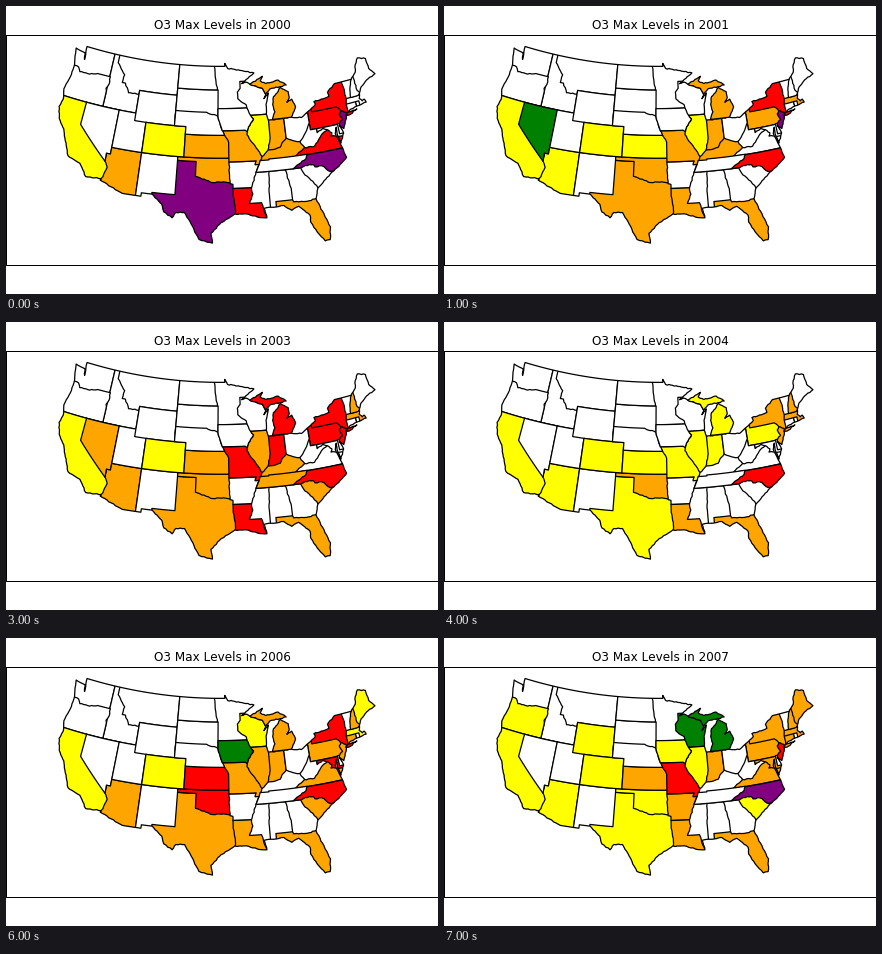
A matplotlib script that plays this animation: 432 by 288 pixels, repeating every 8000 ms.

```python
import numpy as np
import matplotlib.pyplot as plt
from matplotlib.animation import FuncAnimation
from matplotlib.patches import Polygon

W, H, DPI = 432, 288, 72
LINE = 1.25
rng = np.random.default_rng(7)
plt.rcParams["text.kerning_factor"] = 6


def project(lonlat):
    """Lambert conformal conic, standard parallels 33 and 45, to pixels."""
    lon, lat = np.radians(lonlat).T
    p1, p2 = np.radians([33, 45])
    t = lambda p: np.tan(np.pi / 4 + p / 2)
    n = np.log(np.cos(p1) / np.cos(p2)) / np.log(t(p2) / t(p1))
    rho = np.cos(p1) * t(p1) ** n / n / t(lat) ** n
    theta = n * (np.radians(96) - lon)
    return np.c_[214.5 + 437.2 * rho * np.sin(theta),
                 -401.2 + 439 * rho * np.cos(theta)]


def trace(nums, rough=0.07):
    """Outline through key points (west lon, lat): edges along a meridian or
    parallel stay straight, rivers and shores wander a little."""
    pts = np.reshape(nums, (-1, 2)).astype(float)
    out = []
    for a, b in zip(pts, np.roll(pts, -1, axis=0)):
        step = b - a
        size = np.hypot(*step)
        k = int(np.ceil(size / 0.4))
        wander = rng.uniform(-rough, rough, k) * bool(step.all())
        wander[0] = 0
        side = np.array([-step[1], step[0]]) / size
        out += [a + step * j / k + side * wander[j] for j in range(k)]
    return project(np.array(out))


fig = plt.figure(figsize=(W / DPI, H / DPI), dpi=DPI, facecolor="white")
ax = fig.add_axes([0, 0.1, 1, 0.8])
ax.set(xlim=(0, W), ylim=(0.9 * H, 0.1 * H), xticks=[], yticks=[])
ax.spines[:].set_linewidth(1)
title = ax.set_title("", fontsize=12, family="DejaVu Sans")

pacific = [122.76, 49, 122.5, 47.3, 122.8, 48.14, 124.72, 48.39, 124.05, 46.3,
           124.1, 44.6, 124.55, 42.84, 124.1, 41.5, 124.4, 40.44,
           123.75, 38.95, 122.5, 37.8, 121.9, 36.7, 120.65, 34.6,
           118.5, 34.03, 117.12, 32.53]
mexico = [114.72, 32.72, 114.81, 32.5, 111.07, 31.33, 108.21, 31.33,
          108.21, 31.78, 106.53, 31.78, 104.9, 30.6, 104.5, 29.65,
          103.2, 28.98, 102.7, 29.7, 101.4, 29.77, 100.3, 28.3, 99.1, 26.4]
gulf = [97.15, 25.96, 97.4, 27.2, 95.9, 28.6, 93.85, 29.7, 91.8, 29.6,
        90.2, 29.1, 89.1, 29, 89.4, 30.25, 86.4, 30.38, 85.3, 29.65,
        84.2, 30.05, 82.7, 28.7, 82.75, 27.8, 81.8, 26.1, 81.1, 25.15]
atlantic = [80.4, 25.2, 80.03, 26.8, 81.45, 30.7, 80.88, 32.04, 79.2, 33.2,
            77.95, 33.87, 76.5, 34.65, 75.53, 35.23, 75.95, 36.9, 76.3, 38,
            76.5, 38.6, 76.1, 39.4, 76.2, 38.6, 75.95, 37.2, 75.1, 38.45,
            75.5, 39.5, 74.9, 39, 74, 40.4, 74, 40.7, 72.9, 41.25,
            70.65, 41.55, 70, 41.6, 70.2, 42.05, 70.6, 41.9, 71, 42.3,
            70.7, 43, 70.1, 43.7, 68.8, 44.35]
north = [66.97, 44.8, 67.78, 45.7, 67.8, 47.07, 69.23, 47.46, 70, 46.7,
         70.4, 45.75, 71.5, 45.01, 74.7, 45.01, 76.3, 44.1, 76.2, 43.55,
         79.05, 43.27, 78.9, 42.85, 81.7, 41.5, 83.45, 41.73, 87.53, 41.7,
         87.8, 42.49, 87.7, 43.8, 87.1, 45.25, 88, 44.55, 87.6, 45.1,
         88.1, 45.9, 90.42, 46.56, 91, 46.85, 92.02, 46.7, 89.5, 48,
         93.3, 48.6, 94.6, 48.72, 95.15, 49.38, 95.15, 49]

style = dict(ec="black", lw=LINE, joinstyle="round")
land = ax.add_patch(Polygon(
    trace(pacific + mexico + gulf + atlantic + north, 0.06),
    fc="none", zorder=3, **style))
shapes = []   # (state code, patch)


def state(code, *nums, rough=0.07, inland=True):
    """Paint a state over the earlier ones, cut off at the shore."""
    patch = ax.add_patch(Polygon(trace(nums, rough), fc="white", zorder=2,
                                 **style))
    if inland:
        patch.set_clip_path(land)
    else:
        patch.set_zorder(4)
    shapes.append((code, patch))


def box(code, west, east, south, north):
    state(code, west, north, east, north, east, south, west, south)


# Later states cover earlier ones, so each border is given by the upper one.
# West
box("WA", 126, 117.03, 45, 50)
box("ID", 117.03, 111.05, 42, 50)
state("OR", 126, 46.25, 123.2, 46.15, 122.7, 45.6, 121.2, 45.65, 119, 46,
      116.92, 46, 116.85, 45, 117.2, 44.4, 117.03, 43.8, 117.03, 42, 126, 42)
box("CA", 126, 114, 32, 42)
state("NV", 120, 42, 114.04, 42, 114.04, 36.1, 114.7, 36.1, 114.63, 35,
      120, 39, rough=0)
state("AZ", 114.05, 37, 109.05, 37, 109.05, 31, 114.8, 31, 114.72, 32.72,
      114.5, 33, 114.14, 34.3, 114.63, 35, 114.7, 36.1, 114.05, 36.1)
box("UT", 114.05, 109.05, 37, 42)
state("MT", 116.05, 50, 104.05, 50, 104.05, 45, 111.05, 45, 111.05, 44.5,
      113, 44.45, 113.9, 45.6, 114.5, 45.6, 114.35, 46.65, 116.05, 48)
box("WY", 111.05, 104.05, 41, 45)

# Plains
box("TX", 107, 93, 25, 36.5)
state("NM", 109.05, 37, 103.04, 37, 103.04, 32, 106.6, 32, 106.6, 31,
      109.05, 31)
state("OK", 103.04, 37, 94, 37, 94, 33.6, 95.5, 33.9, 97.2, 33.8, 100, 34.56,
      100, 36.5, 103.04, 36.5)
box("CO", 109.05, 102.05, 37, 41)
box("KS", 102.05, 94, 37, 40)
box("MN", 98, 89, 43.5, 50)
box("SD", 104.05, 96.45, 42, 45.94)
state("ND", 104.05, 50, 97.23, 50, 97.23, 49, 96.8, 46.6, 96.56, 45.94,
      104.05, 45.94)
state("WI", 92.3, 47, 92.3, 46.1, 92.85, 45.6, 92.8, 44.75, 91.3, 43.9,
      91.1, 42.5, 86.5, 42.5, 86.5, 47)

# South
box("MS", 91.7, 88, 29.5, 35)
box("FL", 88, 79.5, 24.5, 31.2)
state("AL", 88.2, 35, 84, 35, 84, 31, 87.55, 31, 87.55, 30, 88.45, 30,
      88.45, 32)
box("SC", 83.5, 78, 32, 35.3)
state("GA", 85.6, 35, 83.1, 35, 82.6, 34, 81.5, 33, 80.88, 32.04, 80.5, 30.7,
      82, 30.7, 82.2, 30.57, 84.86, 30.7, 85, 31, 85, 32.5)

# New England and Mid-Atlantic
box("ME", 71.2, 66, 43, 48)
box("MA", 73.6, 69.5, 41.3, 42.8)
box("VT", 73.6, 71.4, 42.74, 45.1)
state("NH", 71.5, 45.4, 71.5, 45, 72.05, 44.1, 72.46, 42.72, 71.3, 42.72,
      70.5, 42.9, 70.98, 43.4, 71.08, 45.4)
box("CT", 73.7, 71.8, 40.9, 42.03)
box("RI", 71.8, 71.2, 41.2, 42.03)
state("NY", 80, 45.5, 73.35, 45.5, 73.25, 43.6, 73.27, 42.7, 73.5, 42.05,
      73.5, 41.2, 73.9, 40.5, 75, 40.5, 80, 41.9)
state("PA", 80.52, 42.4, 79.76, 42.4, 79.76, 42, 75.35, 42, 74.7, 41.36,
      74.7, 39.72, 80.52, 39.72)
box("MD", 79.48, 75, 37.9, 39.72)
box("DE", 75.79, 75, 38.45, 39.8)
state("NJ", 75.42, 39.8, 74.75, 40.2, 75.1, 41, 74.7, 41.36, 73.9, 41,
      73.8, 38.8, 75, 38.8, 75.55, 39.5)
state("VA", 84, 36.58, 75, 36.58, 75, 38, 77.3, 38.4, 77.04, 38.8,
      77.72, 39.32, 80, 39, 84, 38)
state("WV", 83, 40.7, 80.52, 40.7, 80.52, 39.72, 79.48, 39.72, 79.48, 39.2,
      78.4, 39.6, 77.72, 39.32, 78.87, 38.77, 80.3, 37.5, 81.97, 37.54,
      83, 38.4)

# Midwest and the upper South
box("IN", 89, 84.82, 37, 42)
state("OH", 84.82, 42, 80.52, 42, 80.52, 40.64, 81.7, 39.2, 82.6, 38.4,
      84.82, 38.4)
state("NC", 84.3, 36.57, 75, 36.57, 75, 33.5, 78.55, 33.86, 79.67, 34.8,
      80.8, 34.82, 81.05, 35.15, 82.3, 35.2, 83.1, 35, 84.3, 35)
state("AR", 94.62, 36.5, 89.5, 36.5, 90.3, 35, 91.15, 33.02, 94.04, 33.02,
      94.04, 33.55, 94.48, 33.65)
state("LA", 94.04, 33.02, 91.15, 33.02, 91, 32.2, 91.6, 31, 89.75, 31,
      89.5, 30, 88.8, 28.5, 94, 28.5, 93.75, 30.3, 94.04, 32)
state("MO", 95.8, 40.6, 91, 40.6, 88.9, 37, 89.7, 36, 90.38, 36, 90.15, 36.5,
      94.62, 36.5, 94.62, 39.1, 95.3, 40)
state("NE", 104.05, 43, 98.5, 43, 96.45, 42.49, 95.9, 41, 95.3, 40,
      102.05, 40, 102.05, 41, 104.05, 41)
state("IL", 90.64, 42.5, 87.53, 42.5, 87.53, 39.35, 88.05, 37.8, 88, 37,
      89.15, 37, 89.5, 37.6, 90.2, 38.5, 90.7, 39, 91.45, 40, 91.1, 41,
      90.15, 42)
state("IA", 96.45, 43.5, 91.22, 43.5, 90.64, 42.5, 90.15, 42, 91.1, 41,
      91.42, 40.4, 91.73, 40.6, 95.7, 40.6, 96.45, 42.49)
state("KY", 89.5, 36.4, 89.15, 37, 88.05, 37.8, 87.1, 37.8, 86, 38,
      85.4, 38.7, 84.8, 39.1, 83.7, 38.65, 82.6, 38.42, 81.97, 37.54,
      83.68, 36.6, 83.68, 36.4)
state("TN", 89.5, 36.5, 88.07, 36.5, 88.07, 36.62, 81.68, 36.62, 82, 36.1,
      84.3, 35, 90.3, 35, 89.7, 36)

# Pieces beyond the main shore
state("MI", 86.82, 41.74, 86.25, 42.7, 86.5, 43.7, 86.2, 44.7, 85.5, 45.1,
      84.75, 45.78, 83.4, 45.1, 83.35, 44.3, 83.9, 43.75, 82.95, 44.07,
      82.45, 43, 83.45, 41.74, inland=False)
state("MI", 90.42, 46.56, 87.9, 47.47, 88.4, 46.9, 87.4, 46.5, 85, 46.77,
      83.6, 46, 84.75, 45.9, 86.7, 45.75, 87.6, 45.1, 88.1, 45.9,
      inland=False)
state("NY", 74, 40.6, 73.7, 40.9, 71.9, 41.07, 73.5, 40.55, inland=False)

LEVELS = [
    dict(yellow="CA CO IL", orange="AZ KS OK MO MI IN KY FL",
         red="LA NY PA VA", purple="TX NC NJ"),
    dict(green="NV", yellow="CA AZ CO KS IL",
         orange="TX OK MO LA IN KY MI FL PA MA", red="NY NC", purple="NJ"),
    dict(yellow="CA CO", orange="NV AZ TX KS OK IL KY MI FL MA",
         red="MO LA IN NY PA NC", purple="NJ"),
    dict(yellow="CA CO", orange="NV AZ TX KS OK IL KY TN SC FL NH MA",
         red="MO LA IN MI NY PA NJ NC"),
    dict(yellow="CA AZ CO KS TX MO IL IN MI PA",
         orange="OK LA FL NY NJ NH MA", red="NC"),
    dict(yellow="CA CO AZ", red="NC",
         orange="TX OK KS MO IL IN MI LA FL PA NY NJ NH MA SC"),
    dict(green="IA", yellow="CA CO WI ME MA", red="KS OK NC NY MD",
         orange="AZ TX MO IL IN MI LA FL PA NJ VA SC NH CT"),
    dict(green="WI MI", yellow="OR CA WY CO AZ TX OK IA IL SC",
         orange="KS AR LA IN FL PA NY MA NH ME VA MD CT",
         red="MO NJ", purple="NC"),
]


def update(i):
    fill = {s: color for color, names in LEVELS[i].items()
            for s in names.split()}
    for code, patch in shapes:
        patch.set_facecolor(fill.get(code, "white"))
    title.set_text(f"O3 Max Levels in {2000 + i}")
    return [title]


anim = FuncAnimation(fig, update, frames=len(LEVELS), interval=1000,
                     repeat=True, repeat_delay=0, blit=False)
plt.show()
```
